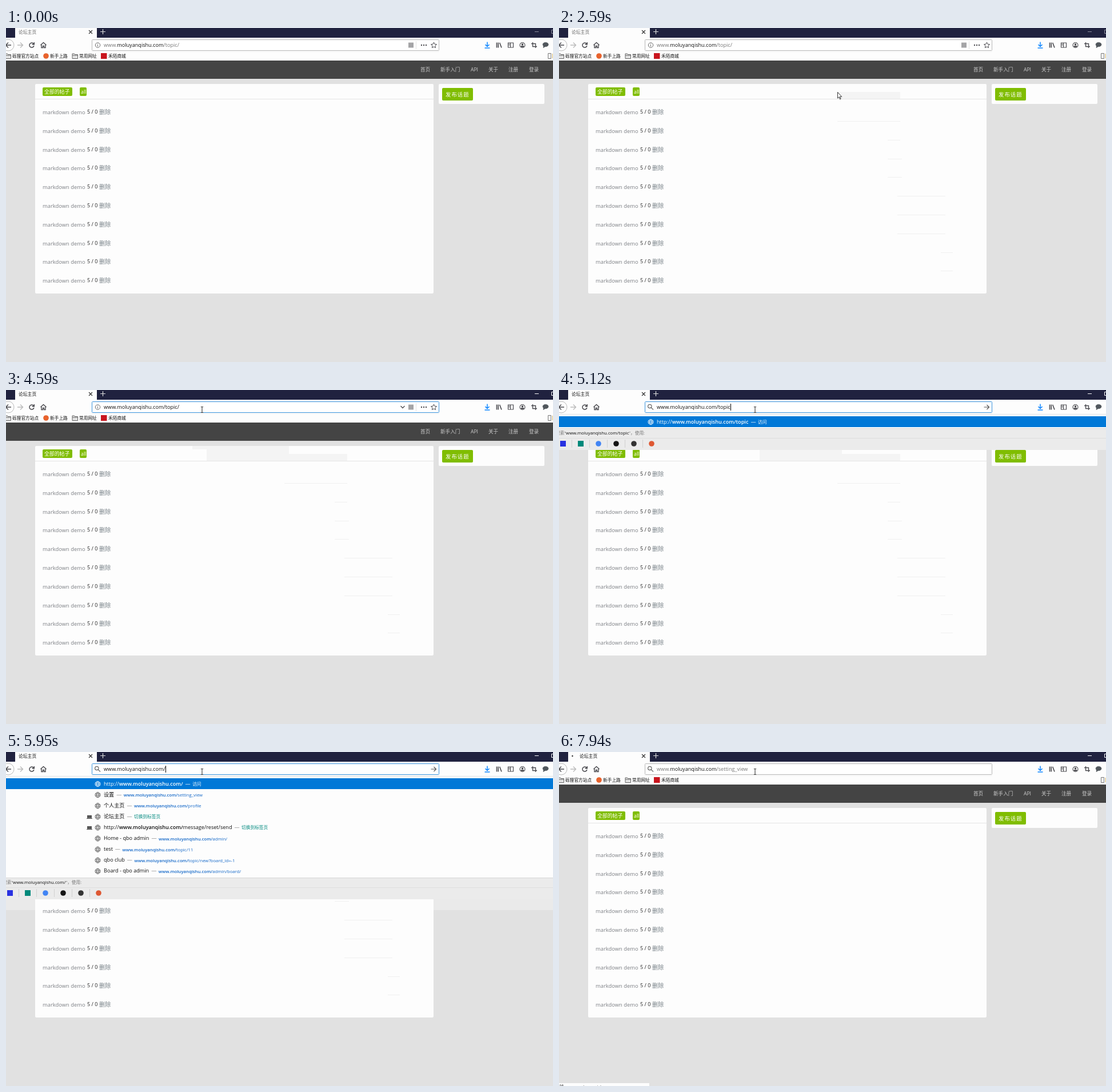
Animation, 957 px wide and 585 px high, one loop 8000 ms. Source, as an HTML page with a canvas:

```html
<!DOCTYPE html>
<html lang="zh-CN">
<head>
<meta charset="utf-8">
<style>
html, body { margin: 0; width: 100%; height: 100%; overflow: hidden; background: #e1e1e1; }
canvas { display: block; }
</style>
</head>
<body>
<canvas id="stage" width="957" height="585"></canvas>
<script>
const ctx = document.getElementById('stage').getContext('2d');
const LOOP = 8000;
const HOST = 'www.moluyanqishu.com';
const BLUE = '#0078d7', GREEN = '#80bd01', ICON = '#4a4a4f';

// Timeline, in ms
const HOVER = 3290, FOCUS = 3680, DESELECT = 4190, EDIT = 5120;
const RESULTS = 5400, ALL_RESULTS = 5950, PICK = 7550, LOAD = 7940;
const DELETIONS = [5120, 5270, 5400, 5550, 5670, 5790];
const CARET_TOGGLES = [4190, 4590, 5120, 6220, 6750, 7270, 7550, 7820];
const ARROW = [[1400, 656, 576], [1930, 681, 490], [2050, 668, 377], [2170, 592, 280],
  [2290, 575, 208], [2430, 589, 174], [2590, 487, 112], [2740, 351, 91],
  [2890, 326, 76], [3020, 327, 65], [3170, 329, 50]];
const BEAM = [[3290, 330, 36], [3410, 334, 31], [3560, 337.5, 28.5], [3940, 343, 34.5]];

const SWITCH = '切换到标签页';
const page = (title, path) => ({ title, url: HOST + path });
const tab = title => ({ title, action: SWITCH });
const HOST_ROWS = [
  page('设置', '/setting_view'), page('个人主页', '/profile'), tab('论坛主页'),
  tab(`http://${HOST}/message/reset/send`), page('Home - qbo admin', '/admin/'),
  page('test', '/topic/11'), page('qbo club', '/topic/new?board_id=-1'),
  page('Board - qbo admin', '/admin/board/')];
const TOPIC_ROWS = [tab('论坛主页'), page('qbo club', '/topic/new?board_id=-1'),
  ...Array.from({ length: 7 }, (_, i) => page('test', '/topic/' + (11 + i)))];

const passed = (times, t) => times.filter(s => t >= s).length;
const latest = (steps, t) => steps.filter(s => t >= s[0]).pop();

function box(x, y, w, h, color, r = 0) {
  ctx.fillStyle = color;
  ctx.beginPath();
  ctx.roundRect(x, y, w, h, r);
  ctx.fill();
}
function dot(x, y, r, color) {
  ctx.fillStyle = color;
  ctx.beginPath();
  ctx.arc(x, y, r, 0, 7);
  ctx.fill();
}
function line(x, y, path, color = ICON, width = 1.2, fill) {
  ctx.save();
  ctx.translate(x, y);
  const shape = new Path2D(path);
  if (fill) { ctx.fillStyle = fill; ctx.fill(shape); }
  ctx.strokeStyle = color;
  ctx.lineWidth = width;
  ctx.stroke(shape);
  ctx.restore();
}
// Draws text on a baseline and returns its right edge
function text(str, x, y, size, color, weight = 400, spacing = 0) {
  ctx.font = `${weight} ${size}px "Open Sans","Noto Sans CJK SC","Noto Sans CJK",sans-serif`;
  ctx.letterSpacing = spacing + 'px';
  ctx.fillStyle = color;
  ctx.fillText(str, x, y);
  return x + ctx.measureText(str).width;
}
function match(str, query, x, y, size, color) {
  const at = str.indexOf(query);
  if (at < 0) return text(str, x, y, size, color);
  x = text(str.slice(0, at), x, y, size, color);
  x = text(query, x, y, size, color, 600);
  return text(str.slice(at + query.length), x, y, size, color);
}

function folder(x, y) {
  line(x, y, 'M0 0h3.5l1 1.5h5v7h-9.5zM0 3h9.5', '#666', 1, '#e4e4e4');
}
function globe(x, y, color) {
  line(x, y, 'M-4.5 0a4.5 4.5 0 1 0 9 0a4.5 4.5 0 1 0-9 0M-4.2-1.5h8.4M-4.2 1.5h8.4' +
    'M0-4.5c-2.6 2.5-2.6 6.5 0 9c2.6-2.5 2.6-6.5 0-9', color, 0.9);
}

function drawPage(t) {
  box(0, 57, 957, 528, '#e1e1e1');
  box(0, 57, 957, 32, '#444');
  [['首页', 725], ['新手入门', 760], ['API', 813], ['关于', 844], ['注册', 879], ['登录', 915]]
    .forEach(([s, x]) => text(s, x, 76, 8.6, '#ccc'));
  box(51, 98, 697, 367, '#fdfdfd', 2);
  drawTrail(t);
  box(51, 124, 697, 1, '#e5e5e5');
  box(64, 104, 52, 15, GREEN, 2);
  text('全部的帖子', 67, 115, 8.9, '#fff');
  box(129, 104, 12, 15, GREEN, 2);
  text('all', 131, 115, 8.8, '#fff');
  for (let i = 0; i < 10; i++) {
    const y = Math.round(151 + i * 32.8);
    text('markdown demo', 64, y, 9.4, '#7b7e83');
    text('5 / 0', 142, y - 1, 9, '#222');
    text('删除', 163, y, 10.2, '#778087');
  }
  box(757, 98, 185, 35, '#fdfdfd', 2);
  box(763, 105, 54, 22, GREEN, 2);
  text('发布话题', 769, 119.5, 9.4, '#fff', 500, 1);
}

// Hover shading and row rules stay where the pointer has passed
function drawTrail(t) {
  if (t >= LOAD) return;
  ctx.save();
  ctx.beginPath();
  ARROW.forEach(([time, x, y], i) => {
    if (!i || t < time) return;
    const [, px, py] = ARROW[i - 1];
    ctx.rect(Math.min(x, px), Math.min(y, py), Math.abs(x - px) + 8, Math.abs(y - py) + 13);
  });
  ctx.clip();
  box(51, 98, 697, 26, '#f4f4f4');
  for (let i = 0; i < 9; i++) box(51, Math.round(163 + i * 32.8), 697, 1, '#f0f0f0');
  ctx.restore();
}

function drawBrowser(t) {
  const active = t >= FOCUS, loading = t >= LOAD;
  box(0, 0, 957, 17, '#20223f');
  box(16, 0, 143, 17, '#fdfdfd');
  box(0, 17, 957, 40, '#fdfdfd');
  if (loading) dot(23.5, 7, 1.2, '#222');
  text('论坛主页', loading ? 36 : 22, 10, 7.8, active ? '#111' : '#666');
  line(148, 7, 'M-3-3L3 3M3-3L-3 3', '#333', 1.2);
  line(169.5, 6.5, 'M-4.5 0h9M0-4.5v9', '#ddd', 1.2);
  const control = active ? '#fff' : '#8a8b9b';
  box(925, 6, 7, 1, control);
  line(954.5, 3.5, 'M6 0h-6v6h6', control, 1);

  line(4, 30, 'M-10 0a10 10 0 1 0 20 0a10 10 0 1 0-20 0', '#bbb', 1);
  line(4, 30, 'M5 0h-9M0-4.5l-4.5 4.5l4.5 4.5', ICON, 1.5);
  line(25, 30, 'M-5 0h9M0-4.5l4.5 4.5l-4.5 4.5', '#bbb', 1.4);
  line(45, 30, 'M3.3-2.2a4 4 0 1 0 .6 3.2M4.3-5v3.7h-3.7', ICON, 1.5);
  line(65.5, 30, 'M-5 0L0-4.5L5 0M-3.5-.5v5h2.5v-3h2v3h2.5v-5', ICON, 1.4);

  line(842, 30, 'M0-5.5v8M-3.5-1L0 2.5L3.5-1M-4.5 5h9', '#0a84ff', 1.5);
  line(862, 30, 'M-3.5-4.5v9M-.8-4.5v9M1.6-4.3L5 4.5', ICON, 1.6);
  line(883, 30, 'M-4.5-4h9v8h-9zM-.5-4v8M-3.5-2h2M-3.5 0h2', ICON, 1.2);
  line(903.5, 30, 'M-4.5 0a4.5 4.5 0 1 0 9 0a4.5 4.5 0 1 0-9 0', ICON, 1.1);
  dot(903.5, 28.8, 1.8, ICON);
  box(900.8, 31, 5.4, 2.5, ICON, 1);
  line(924, 30, 'M-2.5-5v7.5h7.5M-5-2.5h7.5v7.5', ICON, 1.4);
  line(944, 29.5, 'M-5-.5a5 3.8 0 1 1 4 3.7l-3 2l.3-2.6z', '#50565c', 0.6, '#50565c');

  folder(-1, 45);
  text('砾狸官方站点', 11, 52, 7.7, '#111');
  dot(70, 49, 4.8, '#e8622c');
  text('新手上路', 77, 52, 7.7, '#111');
  folder(116, 45);
  text('常用网址', 128, 52, 7.7, '#111');
  box(166, 44, 10.5, 10, '#c9151e');
  text('禾陌商城', 179, 52, 7.7, '#111');
  line(948.5, 44.5, 'M0 0h5v9h-5z', '#777', 1);
  box(956, 45, 1, 8, '#d8b45a');
}

function drawUrlBar(t, path) {
  const focused = t >= FOCUS && t < LOAD, edited = t >= EDIT;
  const hover = t >= HOVER && t < FOCUS;
  box(150, 41, 608, 1, hover ? '#ddd' : '#f4f4f4');
  line(150.5, 20.5, 'M1 0h605q1 0 1 1v17q0 1-1 1h-605q-1 0-1-1v-17q0-1 1-1z',
    focused ? '#3a93dc' : hover ? '#909090' : '#b6b6b6', 1, '#fff');

  if (edited) {
    line(160, 29.5, 'M2-1a3.2 3.2 0 1 0-6.4 0a3.2 3.2 0 1 0 6.4 0M1.3 1.4L5 5', '#666', 1.2);
  } else {
    line(160.5, 30, 'M-4.2 0a4.2 4.2 0 1 0 8.4 0a4.2 4.2 0 1 0-8.4 0M0-.6v3M0-2.5v1', '#666', 1);
  }
  if (!edited) {
    if (t >= HOVER) line(694, 29.5, 'M-3.5-1.5L0 2L3.5-1.5', ICON, 1.3);
    box(704, 25.5, 9, 9, '#a4a4a6');
    box(717, 23, 1, 14, '#e2e2e2');
    [727, 731, 735].forEach(x => dot(x, 30, 1.2, ICON));
    line(748.5, 30, 'M0-5l1.5 3.3l3.5.4l-2.6 2.4l.7 3.5l-3.1-1.7l-3.1 1.7l.7-3.5l-2.6-2.4l3.5-.4z', ICON, 1);
  } else if (focused) {
    line(748, 30, 'M-4.5 0h9M.5-4l4 4l-4 4', '#555', 1.2);
  }

  const y = 33, size = 9.1;
  if (!focused) {
    let x = text('www.', 171, y, size, '#777');
    x = text(HOST.slice(4), x, y, size, '#111');
    text(path, x, y, size, '#777');
    return;
  }
  const end = text(HOST + path, 171, y, size, '#111');
  if (t < DESELECT) {
    box(171, 24, end - 171, 12, BLUE);
    text(HOST + path, 171, y, size, '#fff');
  }
  if (passed(CARET_TOGGLES, t) % 2) box(Math.round(end), 24, 1, 12, '#000');
}

function drawRow(row, index, query, selected) {
  const mid = 55.5 + index * 19.1, y = mid + 3;
  const tint = color => selected ? '#fff' : color;
  if (selected) box(0, Math.round(mid - 9.5), 957, 19, BLUE);
  globe(160.5, mid + 0.5, tint('#555'));
  if (row.action === SWITCH) {
    box(142, mid - 2, 8, 5, '#555');
    box(141, mid + 3.2, 10, 1, '#555');
  }
  let x = match(row.title, query, 171, y, 9.1, tint('#111')) + 4;
  x = text('—', x, y, 9.1, tint('#888')) + 3.5;
  if (row.url) match(row.url, query, x, y + 0.5, 7.7, tint('#1468c8'));
  else text(row.action, x, y + 0.5, 7.7, tint('#058b80'));
}

function drawPopup(t, query) {
  const first = { title: 'http://' + query, action: '访问' };
  const rest = t < RESULTS ? [] : t < ALL_RESULTS ? TOPIC_ROWS : HOST_ROWS;
  const rows = [first, ...rest];
  const foot = rows.length === 1 ? 67 : Math.round(48 + rows.length * 19.1);
  if (t >= ALL_RESULTS) {
    box(0, foot, 51, 277 - foot, '#eaeaea');
    box(748, foot, 209, 277 - foot, '#eaeaea');
  }
  box(0, 42, 957, foot - 42, '#fdfdfd');
  box(0, 42, 957, 1, '#e4e4e4');
  const selected = t >= PICK ? 1 : 0;
  rows.forEach((row, i) => drawRow(row, i, query, i === selected));

  box(0, foot, 957, 38, '#ebebeb');
  box(0, foot, 957, 1, '#d5d5d5');
  box(0, foot + 17, 957, 1, '#dedede');
  let x = text('搜索“', -6, foot + 11, 7.7, '#777');
  x = text(query, x, foot + 11, 7.8, '#111');
  text('”，使用:', x, foot + 11, 7.7, '#777');
  const mid = foot + 27;
  ['#2932e1', '#00897b', '#4285f4', '#151515', '#333', '#de5833'].forEach((color, i) => {
    const cx = 7 + i * 31;
    if (i < 2) box(cx - 5, mid - 5, 10, 10, color);
    else dot(cx, mid, 4.8, color);
    if (i < 5) box(cx + 15, mid - 7, 1, 14, '#d0d0d0');
  });
}

function drawPointer(t) {
  const beam = latest(BEAM, t), arrow = latest(ARROW, t);
  if (beam) {
    line(beam[1], beam[2], 'M-2-5h1.5l.5.5l.5-.5h1.5M0-4.5v9M-2 5h1.5l.5-.5l.5.5h1.5', '#222', 1);
  } else if (arrow) {
    line(arrow[1] + 0.5, arrow[2] + 0.5, 'M0 0v10.5l2.4-2.2l1.7 4l1.5-.7l-1.7-3.8h3.3z', '#222', 0.9, '#fff');
  }
}

function draw(t) {
  const path = t >= PICK ? '/setting_view' : '/topic/'.slice(0, 7 - passed(DELETIONS, t));
  drawPage(t);
  drawBrowser(t);
  drawUrlBar(t, path);
  if (t >= EDIT && t < LOAD) drawPopup(t, HOST + (t >= PICK ? '/' : path));
  if (t >= LOAD) {
    box(0, 580, 158, 5, '#fdfdfd');
    text('正在查找 ' + HOST, -22, 589, 7.7, '#444');
  }
  drawPointer(t);
}

function tick() {
  draw(performance.now() % LOOP);
  requestAnimationFrame(tick);
}
tick();
</script>
</body>
</html>
```
